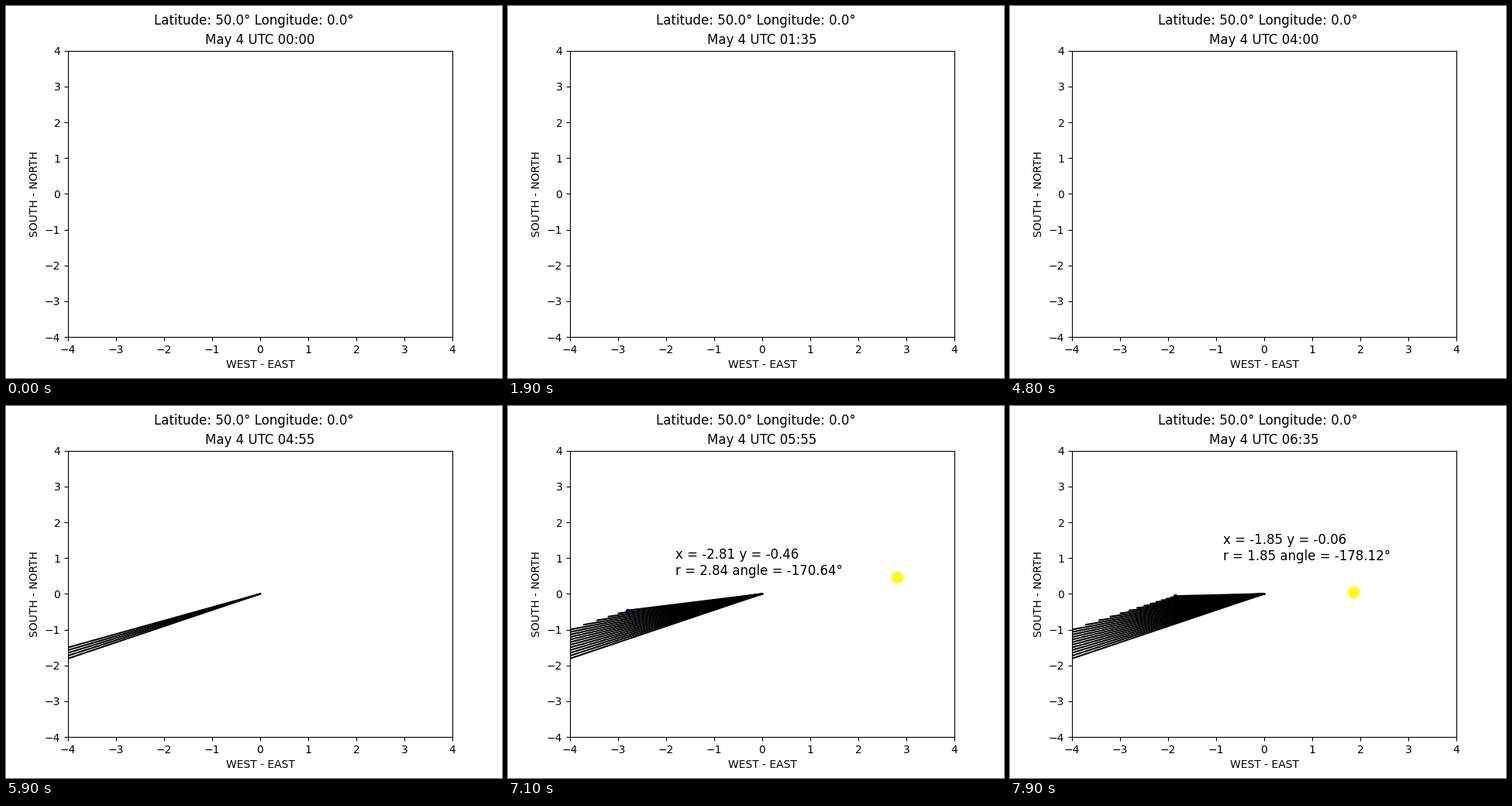
Recreate the animation shown at these times as a matplotlib script. Size 640 px wide and 480 px high, loop 8000 ms.

```python
import numpy as np
import matplotlib.pyplot as plt
from matplotlib.animation import FuncAnimation

FRAMES = 80
STEP_MIN = 5
LAT, LON = 50.0, 0.0
DECLINATION = np.radians(15.806)
POLE = 0.6404  # height of the stick casting the shadow


def shadow_tip(i):
    """Tip of the shadow (west-east, south-north), or None at night."""
    hour = np.radians(177.47 - 1.25 * i)
    lat = np.radians(LAT)
    up = (np.sin(lat) * np.sin(DECLINATION)
          + np.cos(lat) * np.cos(DECLINATION) * np.cos(hour))
    if up <= 0:
        return None
    east = np.cos(DECLINATION) * np.sin(hour)
    north = (np.cos(lat) * np.sin(DECLINATION)
             - np.sin(lat) * np.cos(DECLINATION) * np.cos(hour))
    alt = np.degrees(np.arcsin(up))
    alt += 0.35 / alt - 0.19  # horizon correction
    r = POLE / np.tan(np.radians(alt))
    azimuth = np.arctan2(north, east)
    return -r * np.cos(azimuth), -r * np.sin(azimuth)


def clock(i):
    hours, minutes = divmod(i * STEP_MIN, 60)
    return f"May 4 UTC {hours:02d}:{minutes:02d}"


def readout(x, y):
    angle = np.degrees(np.arctan2(y, x))
    return (f"x = {x:.2f} y = {y:.2f}\n"
            f"r = {np.hypot(x, y):.2f} angle = {angle:.2f}°")


fig, ax = plt.subplots(figsize=(6.4, 4.8), dpi=100)
fig.suptitle(f"Latitude: {LAT}° Longitude: {LON}°")
title = ax.set_title(clock(0))
ax.set(xlim=(-4, 4), ylim=(-4, 4),
       xlabel="WEST - EAST", ylabel="SOUTH - NORTH")

sun, = ax.plot([], [], "o", color="yellow", ms=10)
dot, = ax.plot([], [], "o", color="blue", ms=3)
label = ax.text(0, 0, "", fontsize=12)

tips = [shadow_tip(i) for i in range(FRAMES)]
shadows = {i: ax.plot([0, tip[0]], [0, tip[1]], "k-", lw=1.5)[0]
           for i, tip in enumerate(tips) if tip}


def update(i):
    title.set_text(clock(i))
    for start, line in shadows.items():
        line.set_visible(start <= i)
    if tips[i]:
        x, y = tips[i]
        sun.set_data([-x], [-y])
        dot.set_data([x], [y])
        label.set_position((x + 1, y + 1))
        label.set_text(readout(x, y))
    else:
        sun.set_data([], [])
        dot.set_data([], [])
        label.set_text("")
    return [title, sun, dot, label, *shadows.values()]


anim = FuncAnimation(fig, update, frames=FRAMES, interval=100,
                     repeat=True, repeat_delay=0, blit=False)
plt.show()
```
